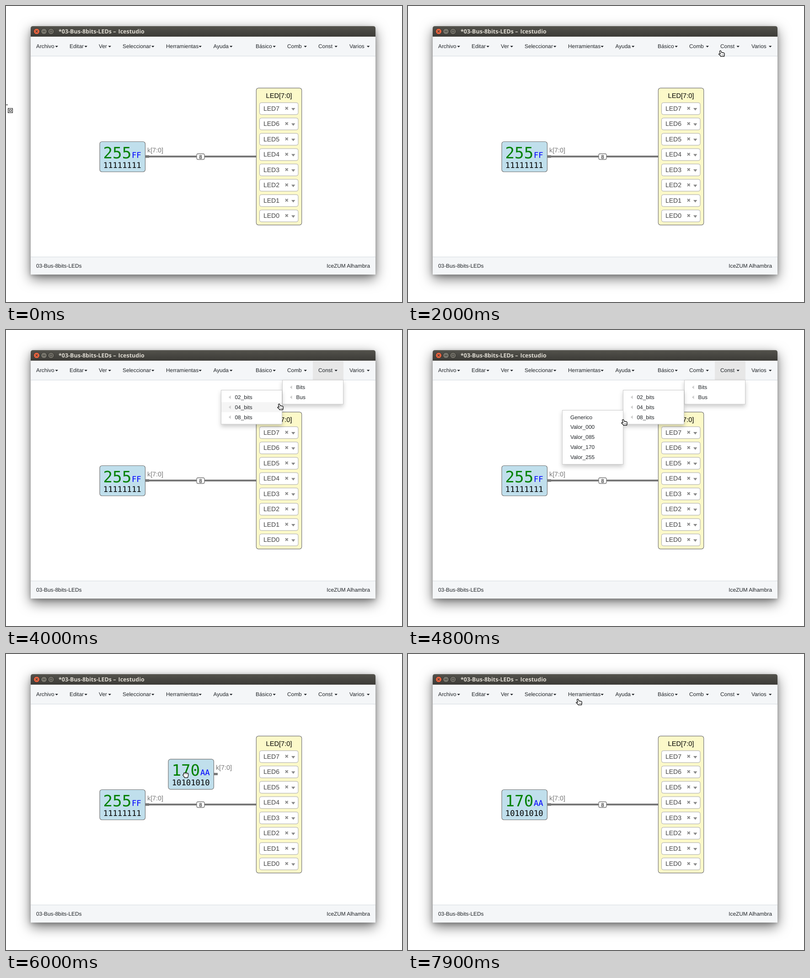
Recreate the animation shown at these times as an HTML page. Size 866 px wide and 647 px high, loop 8 s.

```html
<!DOCTYPE html>
<html lang="es">
<head>
<meta charset="utf-8">
<title>Bus 8 bits</title>
<style>
html, body { margin: 0; width: 100%; height: 100%; overflow: hidden; background: #fff; }
#shadow { position: absolute; left: 54px; top: 44px; width: 754px; height: 543px; border-radius: 5px 5px 0 0;
  box-shadow: 0 9px 28px rgba(0,0,0,.55), 0 3px 8px rgba(0,0,0,.2); }
svg { position: absolute; left: 0; top: 0; display: block; }
text { font: 11.85px "Liberation Sans", Arial, sans-serif; fill: #212529; white-space: pre; text-rendering: geometricPrecision; }
.title { font: bold 12.5px "Open Sans", sans-serif; fill: #dfdbd2; }
.mono { font: 17.2px "DejaVu Sans Mono", monospace; fill: #000; }
.dec { font-size: 34.2px; fill: #008000; }
.hex { fill: #00f; }
.label { font-size: 14.3px; fill: #777; }
.led { font-size: 14px; fill: #444; }
.cursor { fill: #fff; stroke: #000; stroke-width: 1.2; stroke-linejoin: round; }
.menu { filter: drop-shadow(0 5px 5px rgba(0,0,0,.2)); }
</style>
</head>
<body>
<div id="shadow"></div>
<svg id="stage" width="866" height="647" viewBox="0 0 866 647"></svg>
<script>
const LOOP = 8000, STEP = 100, GRID = 8.33, ROW = 21.8;
const HOME = { x: 205, y: 296.5 };

const rect = (x, y, w, h, fill, more = '') =>
  `<rect x="${x}" y="${y}" width="${w}" height="${h}" fill="${fill}" ${more}/>`;
const text = (x, y, s, cls = '', more = '') => `<text x="${x}" y="${y}" class="${cls}" ${more}>${s}</text>`;
const path = (d, fill, more = '') => `<path d="${d}" fill="${fill}" ${more}/>`;
const group = (id, body, more = '') => `<g id="${id}" ${more}>${body}</g>`;

const navItems = [
  ['Archivo', 66, 107.5], ['Editar', 139, 171.5], ['Ver', 203, 223.5], ['Seleccionar', 255, 318],
  ['Herramientas', 350, 421.5], ['Ayuda', 453.5, 489], ['Básico', 546, 583.5], ['Comb', 615, 651.5],
  ['Const', 683, 718.5], ['Varios', 751, 789]
];

const menus = [
  { x: 604.5, y: 109.5, top: 114.2, from: 2300, items: ['Bits', 'Bus'], arrows: true },
  { x: 470.5, y: 131.5, top: 136, from: 3400, items: ['02_bits', '04_bits', '08_bits'], arrows: true },
  { x: 337.5, y: 175.5, top: 179.6, from: 4600, items: ['Generico', 'Valor_000', 'Valor_085', 'Valor_170', 'Valor_255'] }
];
const MENU_W = 133, MENUS_CLOSE = 5700;

function titleBar() {
  const button = (x, fill, glyph) =>
    `<circle cx="${x}" cy="55.5" r="6.5" fill="${fill}" stroke="#33322e"/>` +
    path(glyph, 'none', `transform="translate(${x} 55.5)" stroke="#3c3b37" stroke-width="1.2"`);
  return path('M54 67V49q0-5 5-5H803q5 0 5 5V67Z', 'url(#bar)') +
    button(67, '#ea6440', 'M-2.3-2.3L2.3 2.3M2.3-2.3L-2.3 2.3') +
    button(83, '#77756c', 'M-3 0H3') +
    button(98.5, '#77756c', 'M-2.5-2.5H2.5V2.5H-2.5Z') +
    text(115, 59.5, '*03-Bus-8bits-LEDs –', 'title') + text(245.5, 59.5, 'Icestudio', 'title');
}

function navBar() {
  return rect(54, 67, 754, 42, '#f4f6f8') + rect(54, 109, 754, 1, '#d5dae0') +
    group('active', rect(671, 68, 67, 41, '#e7e7e7')) +
    navItems.map(([name, x, caret]) =>
      text(x, 92, name) + path(`M${caret} 87h6.4l-3.2 3.4Z`, '#212529')).join('');
}

function statusBar() {
  return rect(54, 548, 754, 39, '#f4f6f8') + rect(54, 548, 754, 1, '#d5dae0') +
    text(66, 572, '03-Bus-8bits-LEDs') + text(796, 572, 'IceZUM Alhambra', '', 'text-anchor="end"');
}

function wire() {
  return rect(305, 327, 242, 4, '#777') + rect(305, 326.5, 8, 5, '#777') +
    rect(417, 323, 17, 12.5, '#fff', 'rx="3" stroke="#777" stroke-width="1.3"') +
    text(425.5, 333.5, '8', '', 'text-anchor="middle" style="font-weight:bold;fill:#555"');
}

function constant(id, dec, hex, bits) {
  return group(id,
    rect(100, 30, 8, 5, '#777') +
    rect(0, 0, 99.5, 66, '#c0dfec', 'rx="5" stroke="#777" stroke-width="1.2"') +
    text(7.5, 36, dec, 'mono dec') + text(70, 35, hex, 'mono hex') + text(7.8, 57.3, bits, 'mono') +
    text(104, 23.3, 'k[7:0]', 'label'));
}

function ledPanel() {
  let out = rect(547.3, 179.3, 99.4, 299.4, '#fcf9c9', 'rx="5" stroke="#777" stroke-width="1.2"') +
    text(597, 200.5, 'LED[7:0]', '', 'text-anchor="middle" style="font-size:14.6px;fill:#000"');
  for (let i = 0; i < 8; i++) {
    const y = 211 + i * 33.5;
    out += rect(554.5, y + .3, 84.5, 26, '#fff', 'rx="4" stroke="#aaa"') +
      text(563, y + 17.6, 'LED' + (7 - i), 'led') +
      path(`M611 ${y + 9.8}l5.6 5.6m0 -5.6l-5.6 5.6`, 'none', 'stroke="#888" stroke-width="2"') +
      path(`M624 ${y + 12}h8.4l-4.2 5.6Z`, '#888');
  }
  return out;
}

function menuBox(m, i) {
  const height = m.items.length * ROW + 9;
  const rows = m.items.map((name, r) => {
    const y = m.top + r * ROW;
    return rect(m.x + .5, y, MENU_W - 1, ROW, '#f5f5f5', `id="row${i}${r}"`) +
      text(m.x + (m.arrows ? 30 : 17.5), y + 15, name) +
      (m.arrows ? path(`M${m.x + 21} ${y + 7}v8l-4.5-4Z`, '#ccc') : '');
  }).join('');
  return group('menu' + i, rect(m.x, m.y, MENU_W, height, '#fff', 'stroke="#ccc"') + rows, 'class="menu"');
}

const cursors = {
  select: path('M0 216H4', 'none', 'stroke="#222"') +
    rect(4.7, 223.7, 9.6, 9.6, '#fff', 'stroke="#111" stroke-width="1.6" stroke-dasharray="2 .7"') +
    rect(7.5, 226.5, 4, 4, '#fff', 'stroke="#222"'),
  arrow: path('M.6 .8V15.6L4 12.5L6.2 17.4L8.7 16.3L6.6 11.5H10.6Z', '#fff'),
  hand: path('M3.2 .9C4.3.2 5.2.7 5.6 1.6L7 5C7.7 4.4 8.6 4.6 9 5.2C9.7 4.8 10.5 5 10.9 5.6' +
    'C12 5.2 13.2 5.8 13.2 7V10L12.4 13.4H5.2L4.4 11.5L1 8.8C.2 7.6 1.6 6.7 2.7 7.3L4.4 8L2.6 2.5Q2.4 1.4 3.2 .9Z', '#fff') +
    path('M7.6 9v2.4M9.5 9v2.4M11.3 9v2.4', 'none', 'stroke-width=".6"'),
  grab: path('M2.6 2.4C3.6 1.4 4.7 1.6 5.2 2.2C6 1.3 7.2 1.4 7.8 2.2C8.6 1.6 9.7 1.8 10.2 2.7' +
    'C11.5 2.3 12.7 3 12.7 4.3V7.4L11.3 12.4H4.4L3.6 10.3L1.2 7.6C.5 6.5 1 5.5 2.4 5.5Z', '#fff') +
    path('M5.2 3.2v2M7.8 3.2v2M10.2 3.6v2', 'none', 'stroke-width=".7"')
};

document.getElementById('stage').innerHTML =
  `<defs><linearGradient id="bar" x2="0" y2="1"><stop stop-color="#5b5a53"/><stop offset=".12" stop-color="#504f49"/>
   <stop offset="1" stop-color="#3c3b37"/></linearGradient></defs>` +
  rect(54, 60, 754, 527, '#fff') + titleBar() + navBar() + statusBar() + wire() +
  constant('oldBlock', '255', 'FF', '11111111') + ledPanel() +
  constant('newBlock', '170', 'AA', '10101010') + menus.map(menuBox).join('') +
  Object.entries(cursors).map(([id, shape]) => group(id, shape, 'class="cursor"')).join('');

// Pointer moves: first step, last step, x, y
const moves = [
  [600, 1200, 468, 225], [1300, 1400, 594, 151], [1500, 2100, 693, 88], [3000, 3000, 695, 144],
  [3100, 3100, 697, 149], [3600, 3600, 684, 148], [3800, 4000, 593, 161], [4200, 4400, 592, 197],
  [4600, 4800, 466, 195], [4900, 4900, 454, 203], [5100, 5200, 426, 239], [5400, 5500, 392, 254],
  [5900, 6000, 386, 258], [6300, 6500, 271, 317], [6700, 6800, 263.5, 318.5], [6900, 6900, 262, 329],
  [7300, 7400, 422, 211], [7700, 7900, 367, 98]
];
const pointerKinds = [[0, 'select'], [600, 'arrow'], [1900, 'hand'], [5700, 'grab'], [7300, 'arrow'], [7900, 'hand']];
// New block: time, grid columns and rows away from its final place
const blockSteps = [
  [5700, 19, -9], [5900, 19, -8], [6000, 18, -8], [6300, 13, -6], [6400, 8, -3],
  [6500, 3, -1], [6700, 2, -1], [6900, 0, 0]
];

const el = id => document.getElementById(id);
const show = (id, on) => el(id).style.display = on ? '' : 'none';
const place = (id, x, y) => el(id).setAttribute('transform', `translate(${x} ${y})`);
const latest = (table, t) => table.filter(row => row[0] <= t).pop();

function pointerAt(t) {
  let x = 0, y = 232;
  for (const [start, end, toX, toY] of moves) {
    if (t < start) break;
    const k = Math.min(1, (t - start + STEP) / (end - start + STEP));
    x += (toX - x) * k;
    y += (toY - y) * k;
  }
  return { x, y };
}

function draw(t) {
  const p = pointerAt(t), kind = latest(pointerKinds, t)[1];
  for (const id in cursors) show(id, id === kind);
  if (kind !== 'select') place(kind, p.x, p.y);

  const tipX = p.x + 4, tipY = p.y + 1;
  show('active', t >= menus[0].from && t < MENUS_CLOSE);
  menus.forEach((m, i) => {
    show('menu' + i, t >= m.from && t < MENUS_CLOSE);
    const inside = tipX > m.x + 1 && tipX < m.x + MENU_W - 1;
    const hovered = inside ? Math.floor((tipY - m.top) / ROW) : -1;
    m.items.forEach((_, r) => show(`row${i}${r}`, r === hovered));
  });

  const block = latest(blockSteps, t);
  show('newBlock', block);
  show('oldBlock', t < 6900);
  if (block) place('newBlock', HOME.x + block[1] * GRID, HOME.y + block[2] * GRID);
}

place('oldBlock', HOME.x, HOME.y);
const begin = performance.now();
function tick() {
  const t = (performance.now() - begin) % LOOP;
  draw(Math.floor(t / STEP) * STEP);
  requestAnimationFrame(tick);
}
tick();
</script>
</body>
</html>
```
